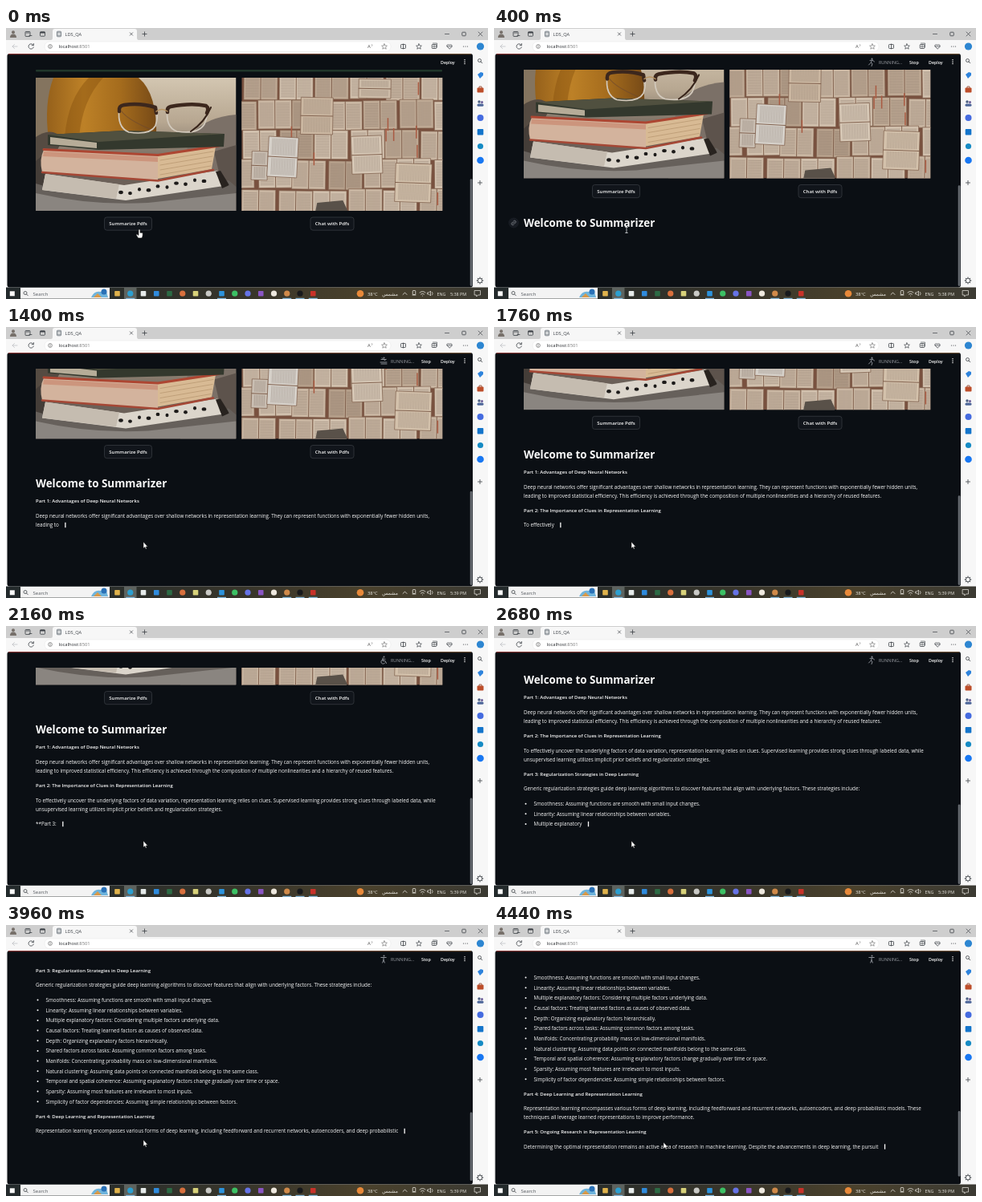
An HTML page for the animation above (4480 ms loop, 600 px wide and 338 px high).

```html
<!DOCTYPE html>
<html lang="en">
<head>
<meta charset="utf-8">
<title>Summarizer demo</title>
<style>
html, body { margin: 0; width: 100%; height: 100%; overflow: hidden; background: #f7f7f7; }
svg { display: block; width: 600px; height: 338px; }
text { font-family: "Open Sans", "DejaVu Sans", sans-serif; white-space: pre; }
</style>
</head>
<body>
<svg id="stage" viewBox="0 0 600 338"></svg>
<script>
const LOOP = 4480, STEP = 40;
const INK = '#3c4046', PAPER = '#fafafa';

// Markup helpers
const rect = (x, y, w, h, fill, extra = '') =>
  `<rect x="${x}" y="${y}" width="${w}" height="${h}" fill="${fill}" ${extra}/>`;
const dot = (x, y, r, fill, extra = '') =>
  `<circle cx="${x}" cy="${y}" r="${r}" fill="${fill}" ${extra}/>`;
const line = (d, color = INK, width = .8, extra = '') =>
  `<path d="${d}" fill="none" stroke="${color}" stroke-width="${width}" stroke-linecap="round" stroke-linejoin="round" ${extra}/>`;
const shape = (d, fill, extra = '') => `<path d="${d}" fill="${fill}" ${extra}/>`;
const label = (x, y, size, text, fill = INK, extra = '') =>
  `<text x="${x}" y="${y}" font-size="${size}" fill="${fill}" ${extra}>${text}</text>`;
const plus = (x, y) => line(`M${x - 2.6} ${y}h5.2M${x} ${y - 2.6}v5.2`);
const lens = (x, y) => dot(x, y, 2, 'none', `stroke="${INK}" stroke-width=".8"`) +
  line(`M${x + 1.5} ${y + 1.5}l1.8 1.8`);
const frame = (x, y, w, h, color = INK) =>
  rect(x - w / 2, y - h / 2, w, h, 'none', `rx=".8" stroke="${color}" stroke-width=".8"`);

// Streamed text: vertical place relative to the heading, kind, words
const lines = [
  [22, 'title', 'Part 1: Advantages of Deep Neural Networks'],
  [41, 'body', 'Deep neural networks offer significant advantages over shallow networks in representation learning. They can represent functions with exponentially fewer hidden units,'],
  [52, 'body', 'leading to improved statistical efficiency. This efficiency is achieved through the composition of multiple nonlinearities and a hierarchy of reused features.'],
  [70, 'title', 'Part 2: The Importance of Clues in Representation Learning'],
  [88.2, 'body', 'To effectively uncover the underlying factors of data variation, representation learning relies on clues. Supervised learning provides strong clues through labeled data, while'],
  [99.7, 'body', 'unsupervised learning utilizes implicit prior beliefs and regularization strategies.'],
  [118, 'title', 'Part 3: Regularization Strategies in Deep Learning'],
  [136, 'body', 'Generic regularization strategies guide deep learning algorithms to discover features that align with underlying factors. These strategies include:'],
  ...[
    'Smoothness: Assuming functions are smooth with small input changes.',
    'Linearity: Assuming linear relationships between variables.',
    'Multiple explanatory factors: Considering multiple factors underlying data.',
    'Causal factors: Treating learned factors as causes of observed data.',
    'Depth: Organizing explanatory factors hierarchically.',
    'Shared factors across tasks: Assuming common factors among tasks.',
    'Manifolds: Concentrating probability mass on low-dimensional manifolds.',
    'Natural clustering: Assuming data points on connected manifolds belong to the same class.',
    'Temporal and spatial coherence: Assuming explanatory factors change gradually over time or space.',
    'Sparsity: Assuming most features are irrelevant to most inputs.',
    'Simplicity of factor dependencies: Assuming simple relationships between factors.'
  ].map((text, i) => [154.6 + 12.66 * i, 'item', text]),
  [299.3, 'title', 'Part 4: Deep Learning and Representation Learning'],
  [318, 'body', 'Representation learning encompasses various forms of deep learning, including feedforward and recurrent networks, autoencoders, and deep probabilistic models. These'],
  [329, 'body', 'techniques all leverage learned representations to improve performance.'],
  [347, 'title', 'Part 5: Ongoing Research in Representation Learning'],
  [365.5, 'body', 'Determining the optimal representation remains an active area of research in machine learning. Despite the advancements in deep learning, the pursuit']
].map(([y, kind, text]) => ({ y, kind, text }));

let script = '';
for (const l of lines) {
  l.start = script.length;
  script += l.text + '\n';
}
const upTo = phrase => script.indexOf(phrase) + phrase.length;
const typing = [
  [1030, 0], [1400, upTo('leading to')], [2160, upTo('Part 3:')], [3320, upTo('Temporal and spatial')],
  [3960, upTo('deep probabilistic')], [4440, upTo('the pursuit')]
];

function tween(keys, t) {
  if (t <= keys[0][0]) return keys[0][1];
  for (let i = 1; i < keys.length; i++) {
    const [t0, a] = keys[i - 1], [t1, b] = keys[i];
    if (t <= t1) return a + (b - a) * (t - t0) / (t1 - t0);
  }
  return keys[keys.length - 1][1];
}
const latest = (keys, t) => keys.filter(k => k[0] <= t).pop();

// Pictures, each about 250 x 166
function stackOfBooks() {
  let spots = '';
  for (let i = 0; i < 10; i++)
    spots += `<ellipse cx="${106 + i * 11.5}" cy="${143 - i * 1.9 + (i % 2) * 3}" rx="${2.8 - i % 3 * .4}" ry="2.2" fill="#1d1b1a"/>`;
  return rect(0, 0, 249.5, 166, 'url(#wall)') +
    shape('M0 0H26Q14 30 20 74L0 84Z', '#84745f') +
    shape('M22 0H128Q152 20 150 76L16 76Q10 32 22 0Z', 'url(#pillow)') +
    shape('M84 0Q58 28 54 74H36Q40 26 66 0Z', '#85510f', 'opacity=".45"') +
    shape('M190 76Q206 50 249.5 46V166H180Z', '#7b7067') +
    shape('M0 74Q20 60 34 76L20 104 0 108Z', '#554b42') +
    shape('M0 104L14 92 12 166H0Z', '#443d38') +
    shape('M222 92L249.5 84V142L230 126Z', '#5d534c') +
    shape('M0 132Q60 150 120 152L240 128 249.5 136V166H0Z', '#66605b') +
    shape('M0 144Q70 160 140 156L249.5 144V166H0Z', '#8a8580') +
    shape('M12 120L110 134 226 116 241 134 112 153 8 140Z', '#dbd5cb') +
    shape('M12 120L104 133 100 151 8 140Z', '#c5bcb0') +
    shape('M224 117L230 116 241 134 232 138Z', '#28231f') + spots +
    shape('M10 90L152 97V128L8 118Q4 102 10 90Z', '#d3b39d') +
    shape('M10 92L152 99V105L9 98Z', '#c98268', 'opacity=".6"') +
    shape('M152 97L224 86 219 114 152 126Z', '#d8ba94') +
    line('M155 103L221 92M155 109L220 98M155 115L219 104M155 121L218 110', '#b5946e', .7) +
    line('M10 89.5L152 96.5 228 85', '#ad4632', 3) + line('M8 118L152 128.5 221 115', '#a54735', 2.6) +
    shape('M15 71L110 66 235 70 234 86 78 90 15 84Z', '#33382d') +
    shape('M15 71L110 66 235 70 78 80Z', '#50503f') +
    shape('M18 74L76 81V88L18 83Z', '#b6ac98') +
    line('M104 39Q101 62 116 68 142 72 149 60 153 48 150 38M164 38Q161 62 176 67 202 71 210 58 215 46 213 37', '#d2c9bc', 1.7) +
    line('M104 42Q103 35 110 34 130 31 149 37L150 44M164 43Q163 37 168 36 194 31 212 35 216 38 213 44', '#3c271d', 4.5) +
    line('M150 42Q157 37 164 42', '#b89462', 1.5) +
    line('M218 37Q210 56 193 67', '#38251b', 2) + line('M107 42Q114 52 142 64', '#6a4631', 1.2, 'opacity=".6"');
}

function wallOfPages() {
  let seed = 7;
  const rnd = () => (seed = seed * 16807 % 2147483647) / 2147483647;
  const tones = ['#c9b6a2', '#bea994', '#d1c0ad', '#b59f8a'];
  function spread(x, y, w, h, fill, tilt) {
    let print = '';
    for (let r = 4; r < h - 3; r += 2)
      print += `M${x + 2.5} ${y + r}h${w / 2 - 5}M${x + w / 2 + 2} ${y + r}h${w / 2 - 5}`;
    return `<g transform="rotate(${tilt} ${x} ${y})">` +
      rect(x, y, w, h, fill, 'stroke="#7d5d4a" stroke-width=".7"') +
      line(print, '#75655a', .7, 'opacity=".5"') +
      line(`M${x + w / 2} ${y}v${h}`, '#80614e', 1) + '</g>';
  }
  const sideways = (x, y, w, h, fill, tilt) => spread(x + w, y, h, w, fill, 90 + tilt);
  let out = rect(0, 0, 250, 166, '#79513f');
  for (let row = 0; row < 5; row++)
    for (let col = -1; col < 6; col++)
      out += spread(col * 44 + row % 2 * 17 + rnd() * 4, row * 37 - 10 + rnd() * 3, 42, 36,
        tones[Math.floor(rnd() * 4)], rnd() * 2 - 1);
  for (let i = 0; i < 12; i++)
    out += rect(5 + rnd() * 240, rnd() * 150, 1.5, 16, '#a95a42');
  return out + sideways(74, 25, 40, 46, '#cbb7a1', 1) + sideways(146, 2, 40, 24, '#cdbca8', 1) +
    sideways(13, 92, 20, 36, '#c9beb2', 2) + sideways(34, 75, 37, 50, '#d6d1ca', 3) +
    sideways(136, 72, 38, 47, '#d6c7b5', -2) + sideways(192, 108, 45, 48, '#d3c1ab', 2) +
    shape('M94 156L126 153 132 166H92Z', '#595149');
}

function tabBar() {
  return rect(0, 0, 600, 16, '#cecece') + rect(0, 15, 600, 309, '#f7f7f7') +
    shape('M56 15Q58 15 58 12V4Q58 1 61 1H160Q163 1 163 4V12Q163 15 165 15Z', '#f7f7f7') +
    dot(9, 5.2, 2, '#77706a') + shape('M5 12Q5 7.5 9 7.5T13 12Z', '#77706a') +
    frame(27, 7.5, 6, 6) + line('M25 6h4M29 9.5h3') + frame(45.5, 7.5, 6, 5.5) + rect(42.5, 4.8, 6, 1.7, INK) +
    frame(66, 7.5, 5, 6.5, '#59636b') + line('M64.5 6h3M64.5 9h3', '#59636b', .9) +
    label(73.5, 9.8, 5.7, 'LDS_QA') + line('M154.3 5.8l3.4 3.4M157.7 5.8l-3.4 3.4', INK, .7) + plus(172.5, 7.5) +
    line('M546.5 7.5h5M588 5l5 5M593 5l-5 5', INK, .7) + frame(570, 7.5, 4.5, 4.5);
}

function addressBar() {
  return line('M14 23H8M10.5 20.5L8 23l2.5 2.5', '#bec1c5') +
    line('M34 21.3A3.2 3.2 0 1 0 34.3 24M34.4 19.5v2.2h-2.2') +
    rect(48, 17, 431, 12.5, '#fff', 'rx="6" stroke="#e4e4e4" stroke-width=".5"') +
    dot(55, 23, 2.4, 'none', 'stroke="#555" stroke-width=".6"') + line('M55 22.8v1.4M55 21.7v.1', '#555', .6) +
    label(65.5, 25.2, 5.8, 'localhost<tspan fill="#777">:8501</tspan>', '#24272b') +
    label(450, 25.2, 6, 'A', '#555') + line('M455.5 20.5q1 1 0 2', '#555', .5) +
    line('M471 19.8l1 2.2 2.4.2-1.8 1.6.6 2.4-2.2-1.3-2.2 1.3.6-2.4-1.8-1.6 2.4-.2Z', '#666', .6) +
    frame(494.5, 23, 6, 5) + line('M494.5 20v6') +
    line('M514 19.8l1 2.2 2.4.2-1.8 1.6.6 2.4-2.2-1.3-2.2 1.3.6-2.4-1.8-1.6 2.4-.2Z', INK, .7) +
    frame(533, 23, 5.5, 5) + line('M533 21.5v3M531.5 23h3M531.5 19h5v5', INK, .6) +
    line('M552 26l-3-3q-1-3 3-1.8 4-1.2 3 1.8ZM549 23h6', INK, .7) +
    [569.5, 572, 574.5].map(x => dot(x, 23, .6, INK)).join('') + dot(590.5, 23, 4.6, '#2d86d1');
}

function sideBar() {
  return rect(581, 32, 19, 292, '#f7f7f7') + lens(589.5, 40.5) +
    shape('M587 58l4-3 3 1v3l-4 4Z', '#2e83dc') +
    rect(586.5, 74.5, 8, 6, '#bd4e2a', 'rx="1"') + line('M589 74.5v-1.5h3v1.5', '#8f3a20') +
    dot(589, 92, 1.7, '#4a5d80') + dot(592.5, 92.5, 1.5, '#6a5c98') + rect(586.5, 94.5, 8, 3.3, '#4d6699', 'rx="1.6"') +
    dot(590.5, 112, 4, '#456be0') + rect(586.7, 126, 7.6, 7.6, '#1475cb', 'rx="1"') +
    dot(590.5, 147.5, 3.6, '#168bc4') + dot(590.5, 165, 4.3, '#1877f2') + plus(590, 193) +
    line('M590 311v8M586 315h8M587.2 312.2l5.6 5.6M592.8 312.2l-5.6 5.6', INK, 1) +
    dot(590, 315, 2.7, '#f7f7f7', `stroke="${INK}" stroke-width=".8"`);
}

function taskBar() {
  const apps = [['#e0b34c', 1], ['#2c9fd0', 0], ['#e6ebea', 1], ['#2f8bdd', 1], ['#2c6b45', 1], ['#d9703d', 0],
    ['#d8d27a', 1], ['#c9c9c5', 0], ['#2c93dd', 1], ['#3cc164', 0], ['#6673e6', 0], ['#8a55c4', 1],
    ['#efe9df', 0], ['#d08a4a', 0], ['#17191c', 0], ['#c8322a', 1]];
  const opened = [1, 8, 13, 14, 15], light = '#eceae4';
  let out = rect(0, 323.5, 600, 14.5, 'url(#bar)') + rect(4.8, 328.3, 6, 6, PAPER) +
    rect(18, 324, 111, 13.6, '#f3f3f3') + lens(24, 330.5) + label(33.5, 333.5, 6, 'Search', '#555a60') +
    shape('M106 336Q110 327 118 329L124 326 127 336Z', '#6fb4dc') + dot(122, 329, 3.5, '#2a71b7') +
    shape('M109 336l5-5 5 5Z', '#d99a4a') + rect(147, 324, 15.5, 14, '#5d635f');
  apps.forEach(([fill, square], i) => {
    const x = 138.5 + i * 16.25;
    out += square ? rect(x - 3.3, 328, 6.6, 6.6, fill, 'rx=".8"') : dot(x, 331.2, 3.6, fill);
    if (opened.includes(i)) out += rect(x - 5.5, 336.8, 11, 1.2, '#86b9dc');
  });
  return out + dot(441, 331.3, 4.3, '#e8893a') + label(450, 333.5, 5.8, '38°C', light) +
    label(478, 333.5, 6, 'مشمس', light, 'text-anchor="middle" style="font-family:\'DejaVu Sans\',sans-serif"') +
    line('M494 332.5l2.5-2.5 2.5 2.5', light) + frame(508, 330, 3.5, 5, light) + line('M506 333h4', light) +
    line('M515 330q3.5-3 7 0M516.5 332q2-1.6 4 0M518.5 334v.1', light) +
    line('M525 330h1.5l2-2v6l-2-2H525ZM530.5 329.5q1.6 1.7 0 3.5', light, .7) +
    label(536.5, 333.5, 5.4, 'ENG', light) + label(553, 333.5, 5.4, '', light, 'id="clock"') +
    line('M583.5 327.5h7v5.5h-3l-1.8 2v-2h-2.2Z', light, .7);
}

const button = (x, w, text) =>
  rect(x, -47.5, w, 16.2, '#11151b', 'rx="3" stroke="#3b3f46" stroke-width=".7"') +
  label(x + w / 2, -37.1, 6.1, text, PAPER, 'font-weight="600" text-anchor="middle"');

function streamed(l) {
  const x = l.kind === 'item' ? 49.5 : 37;
  const bullet = l.kind === 'item' ? dot(39.5, l.y, 1, PAPER) : '';
  return `<g class="row">${bullet}${label(x, l.y + 2.3, 6.26, '', PAPER)}</g>`;
}

const poses = {
  run: 'M471 40l-2 3 2 1.5-1 3M469 43.5l-2.5 2.5M468 40.5l3-.5 2.5 2',
  row: 'M467 40.5h6M466 44h8M468 38.5l3 3 2-1M467 46h7',
  wheel: 'M469 40v3.5h3l1.5 3M469.5 42a2.6 2.6 0 1 0 2.3 3.8M469 41.3h3',
  stand: 'M470 40.5v3l-1.3 3.5M470 43.5l1.3 3.5M466.8 40.5h6.4'
};
const poseOrder = ['stand', 'row', 'run', 'wheel', 'wheel', 'run', 'stand', 'run', 'row'];

const pointers = {
  hand: shape('M-1 -4Q0-5 1-4V0Q2-1 2.7 0 4-.6 4.2 .6V3Q4 5 3 6.5H-1.5L-4 2.5Q-3.5 1-1 3Z', '#fff', 'stroke="#111" stroke-width=".6"'),
  beam: line('M-1.3-3.5H1.3M0-3.5V3.5M-1.3 3.5H1.3', '#d9dbde', .8),
  arrow: shape('M-1-4V4L.8 2.4 2 5 3.2 4.4 2 2H4.4Z', '#fff', 'stroke="#111" stroke-width=".5"')
};

const gradient = (id, stops, extra = '') => `<linearGradient id="${id}" ${extra}>` +
  stops.map((c, i) => `<stop offset="${i / (stops.length - 1)}" stop-color="${c}"/>`).join('') + '</linearGradient>';

const stage = document.getElementById('stage');
stage.innerHTML = '<defs>' +
  gradient('wall', ['#d3c6b1', '#b7a791', '#6b6058', '#6b6058'], 'x2="0" y2="1"') +
  gradient('pillow', ['#96611b', '#bd8127', '#a56c1d', '#774a17']) +
  gradient('ribbon', ['#a33a37', '#7d5a38']) +
  gradient('bar', ['#232a2c', '#2c2f2b', '#38352a', '#4a412c', '#3b3a33']) +
  `<clipPath id="view"><rect x="2" y="52" width="575" height="271"/></clipPath>
  <clipPath id="left"><rect width="249.5" height="166"/></clipPath>
  <clipPath id="right"><rect width="250" height="166"/></clipPath></defs>` +
  tabBar() + addressBar() + sideBar() +
  rect(1.5, 32, 579.5, 291.5, '#0b0f14', 'rx="3"') + rect(3, 32.2, 576, .9, 'url(#ribbon)') +
  `<g clip-path="url(#view)"><g id="page">` +
  rect(37, -231.5, 506, 2.6, '#20362a', 'rx="1"') +
  `<g transform="translate(37 -221.5)" clip-path="url(#left)">${stackOfBooks()}</g>` +
  `<g transform="translate(293.3 -221.5)" clip-path="url(#right)">${wallOfPages()}</g>` +
  button(122.5, 59, 'Summarize Pdfs') + button(379, 54, 'Chat with Pdfs') +
  label(37, 5, 13.4, 'Welcome to Summarizer', PAPER, 'id="heading" font-weight="700"') +
  `<g id="anchor">${dot(24.5, 0, 6.5, '#171b22')}<g transform="rotate(-45 24.5 0)">` +
  line('M24 1.5h-1.2a1.5 1.5 0 0 1 0-3H24M25-1.5h1.2a1.5 1.5 0 0 1 0 3H25M23 0h3', '#8b8f96', .7) + '</g></g>' +
  lines.map(streamed).join('') + rect(0, 0, 1.3, 6.4, PAPER, 'id="caret"') + `</g></g>` +
  `<g id="status">${dot(470.5, 38.6, 1, '#8b8f96')}${line('', '#8b8f96', 1, 'id="pose"')}` +
  label(479, 44.5, 5.4, 'RUNNING...', '#a0a3a9') + label(517, 44.5, 5.4, 'Stop', PAPER, 'font-weight="600"') + `</g>` +
  label(541, 44.5, 5.3, 'Deploy', PAPER, 'font-weight="600"') +
  [39.8, 42.2, 44.6].map(y => dot(571, y, .75, PAPER)).join('') +
  rect(577.7, 0, 2.8, 0, '#686c72', 'rx="1.4" id="thumb"') +
  taskBar() + Object.keys(pointers).map(k => `<g id="${k}">${pointers[k]}</g>`).join('');

const el = id => document.getElementById(id);
const show = (node, on) => node.setAttribute('display', on ? 'inline' : 'none');
const put = (node, attrs) => { for (const k in attrs) node.setAttribute(k, attrs[k]); };
const rows = [...document.querySelectorAll('.row')];

// Text shown on one line; only whole words appear
function wordsSoFar(l, typed) {
  const n = Math.floor(typed - l.start + 1e-6);
  if (n >= l.text.length) return l.text;
  if (n <= 0) return '';
  return l.text[n] === ' ' ? l.text.slice(0, n) : l.text.slice(0, Math.max(0, l.text.lastIndexOf(' ', n)));
}

function pageTop(t, lastY) {
  if (t < 320) return tween([[200, 283.5], [320, 243]], t);
  if (t <= 3400) return Math.max(47, Math.min(243, 247 - lastY));
  return tween([[3400, 47], [3800, -61], [4040, -61], [4240, -89]], t);
}

function draw(t) {
  const typed = tween(typing, t);
  const headed = t >= 240;
  let active = null;
  lines.forEach((l, i) => {
    const words = t > 1030 ? wordsSoFar(l, typed) : '';
    const raw = l.kind === 'title' && words !== l.text;
    const text = rows[i].querySelector('text');
    show(rows[i], words);
    text.textContent = raw ? '**' + words : words;
    put(text, l.kind === 'title' && !raw
      ? { 'font-weight': 600, 'font-size': 6 } : { 'font-weight': 400, 'font-size': 6.26 });
    if (words) active = { l, text };
  });

  const lastY = active ? active.l.y : headed ? 4 : -40;
  const top = pageTop(t, lastY);
  put(el('page'), { transform: `translate(0 ${top})` });
  show(el('heading'), headed);
  show(el('anchor'), headed && t < 760);
  show(el('caret'), active);
  if (active) put(el('caret'), {
    x: +active.text.getAttribute('x') + active.text.getComputedTextLength() + 7.4, y: lastY - 3.2
  });

  const scrolled = 622 - top;
  const height = Math.max(665 + lastY, scrolled + 290);
  put(el('thumb'), { y: 32 + 290 * scrolled / height, height: 290 * 290 / height });

  show(el('status'), t >= 160);
  put(el('pose'), { d: poses[poseOrder[Math.floor(t / 160) % poseOrder.length]] });
  el('clock').textContent = t < 900 ? '5:38 PM' : '5:39 PM';

  const [, kind] = latest([[0, 'hand'], [240, 'beam'], [760, 'arrow'], [3200, 'beam'], [3480, 'arrow']], t);
  const x = tween([[0, 166], [400, 165], [640, 165], [800, 172], [4120, 172], [4400, 212]], t);
  const y = tween([[0, 255.5], [240, 252], [640, 252], [800, 272], [3120, 272], [3240, 268], [3400, 268], [3520, 272], [4120, 272], [4400, 275]], t);
  for (const k in pointers) show(el(k), k === kind);
  put(el(kind), { transform: `translate(${x} ${y})` });
}

const begin = performance.now();
function tick() {
  const t = (performance.now() - begin) % LOOP;
  draw(Math.floor(t / STEP) * STEP);
  requestAnimationFrame(tick);
}
tick();
</script>
</body>
</html>
```
